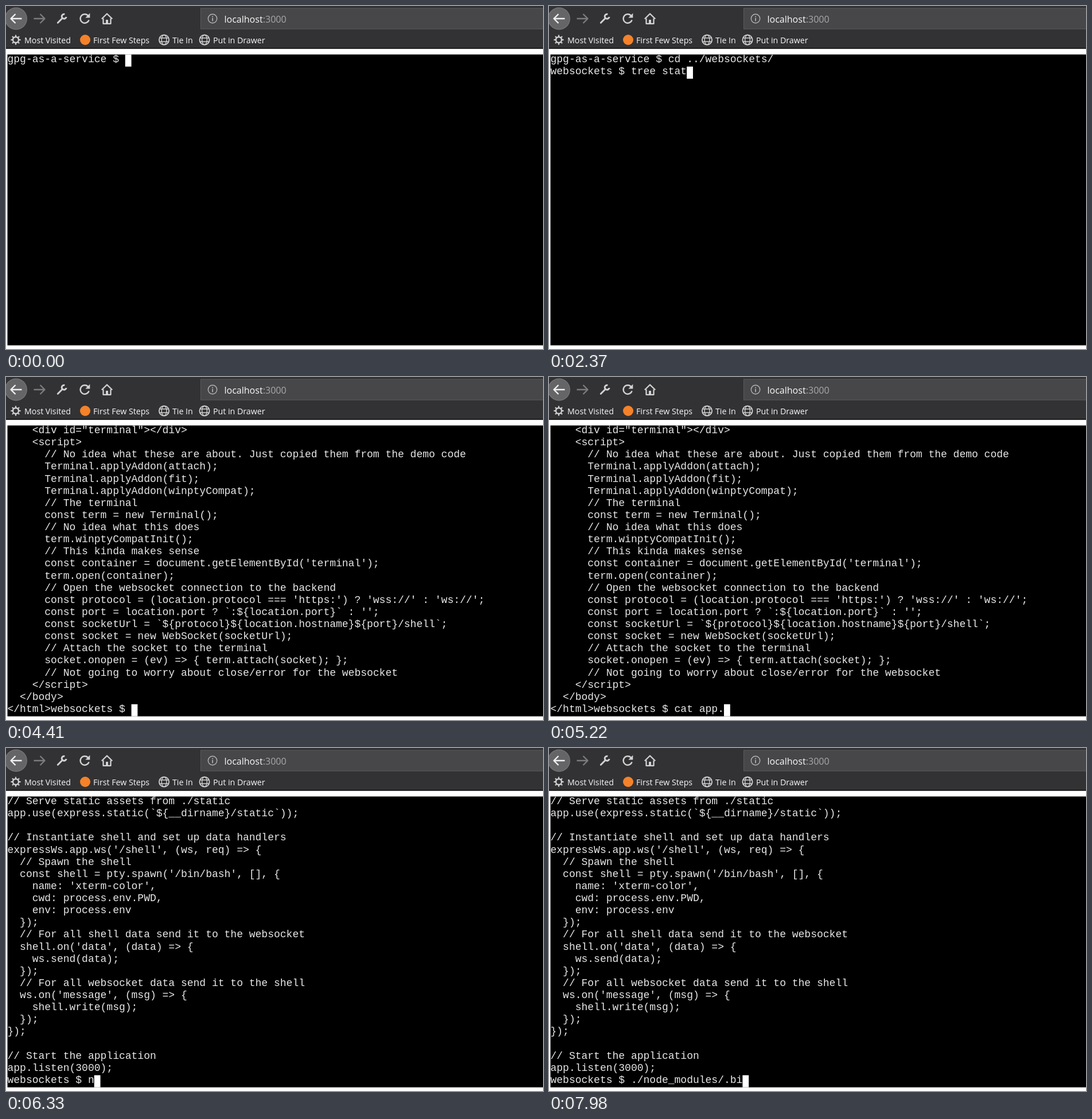
Animation of 936 by 598 pixels, one loop 8 s. Source, as an HTML page with a canvas:

```html
<!DOCTYPE html>
<html lang="en">
<head>
<meta charset="utf-8">
<title>Terminal in the browser</title>
<style>
  html, body { margin: 0; width: 100%; height: 100%; overflow: hidden; background: #fff; }
  canvas { display: block; }
</style>
</head>
<body>
<canvas id="stage" width="936" height="598"></canvas>
<script>
const ctx = document.getElementById("stage").getContext("2d");
const LOOP = 8000;
const LEFT = 2.5, TOP = 84.5, COL = 10.802, ROW = 21.13, BASELINE = 13.5;
const UI = '"Open Sans", "Noto Sans", sans-serif';
const MONO = '"Liberation Mono", monospace';

const STYLES = {
  plain: { color: "#e8e8e8" },
  file: { color: "#8ae234", bold: true },
  link: { color: "#34e2e2", bold: true },
  dir: { color: "#3465a4", back: "#4e9a06" }
};

const TREE = [
  [["dir", "static"]],
  [["plain", "├── "], ["file", "index.html"]],
  [["plain", "├── "], ["dir", "js"]],
  [["plain", "│   ├── "], ["file", "main.js"]],
  [["plain", "│   └── "], ["file", "main.ts"]],
  [["plain", "└── "], ["link", "node_modules"], ["plain", " -> "], ["dir", "../node_modules"]],
  "",
  "2 directories, 3 files"
];

const PAGE = `    <div id="terminal"></div>
    <script>
      // No idea what these are about. Just copied them from the demo code
      Terminal.applyAddon(attach);
      Terminal.applyAddon(fit);
      Terminal.applyAddon(winptyCompat);
      // The terminal
      const term = new Terminal();
      // No idea what this does
      term.winptyCompatInit();
      // This kinda makes sense
      const container = document.getElementById('terminal');
      term.open(container);
      // Open the websocket connection to the backend
      const protocol = (location.protocol === 'https:') ? 'wss://' : 'ws://';
      const port = location.port ? \`:\${location.port}\` : '';
      const socketUrl = \`\${protocol}\${location.hostname}\${port}/shell\`;
      const socket = new WebSocket(socketUrl);
      // Attach the socket to the terminal
      socket.onopen = (ev) => { term.attach(socket); };
      // Not going to worry about close/error for the websocket
    <\/script>
  </body>`.split("\n");

const SERVER = `// Serve static assets from ./static
app.use(express.static(\`\${__dirname}/static\`));

// Instantiate shell and set up data handlers
expressWs.app.ws('/shell', (ws, req) => {
  // Spawn the shell
  const shell = pty.spawn('/bin/bash', [], {
    name: 'xterm-color',
    cwd: process.env.PWD,
    env: process.env
  });
  // For all shell data send it to the websocket
  shell.on('data', (data) => {
    ws.send(data);
  });
  // For all websocket data send it to the shell
  ws.on('message', (msg) => {
    shell.write(msg);
  });
});

// Start the application
app.listen(3000);`.split("\n");

// Timeline: each entry holds the finished lines and the line with the cursor.
const timeline = [];

function show(time, lines, input) {
  timeline.push({ time, lines, input });
}

// Each key adds text; every \b removes one character.
function type(from, to, keys) {
  keys.forEach((key, i) => {
    const { lines, input } = timeline[timeline.length - 1];
    const time = keys.length > 1 ? from + (to - from) * i / (keys.length - 1) : from;
    const next = key[0] === "\b" ? input.slice(0, -key.length) : input + key;
    show(Math.round(time / 30) * 30, lines, next);
  });
}

function enter(time) {
  const { lines, input } = timeline[timeline.length - 1];
  show(time, [...lines, input].slice(-23), "");
}

function output(time, extra, prompt) {
  const { lines } = timeline[timeline.length - 1];
  show(time, [...lines, ...extra].slice(-23), prompt);
}

const PROMPT = "websockets $ ";
show(0, [], "gpg-as-a-service $ ");
type(60, 300, [..."cd .."]);
type(480, 540, [..."/e"]);
type(690, 1140, ["\b", ..."websoc", "kets/"]);
show(1560, ["gpg-as-a-service $ cd ../websockets/"], PROMPT);
type(1890, 2400, [..."tree stati"]);
type(2700, 2700, ["c"]);
enter(3030);
output(3060, TREE, PROMPT);
type(3300, 3480, [..."cat"]);
type(3630, 3870, [..." sta", "tic/"]);
type(4020, 4140, ["i", "n", "dex.html "]);
enter(4380);
output(4410, PAGE, "</html>" + PROMPT);
type(4620, 4980, [..."cat app"]);
type(5220, 5370, [...".ts"]);
enter(5730);
output(5760, SERVER, PROMPT);
type(6330, 6630, [..."node a", "pp"]);
type(6840, 6900, ["\b\b", "\b"]);
type(7080, 7200, ["\b", "\b\b", "\b\b"]);
type(7260, 7500, [..."./nod"]);
type(7620, 7620, ["e_modules/"]);
type(7830, 7980, [...".bi"]);

function rect(x, y, w, h, color) {
  ctx.fillStyle = color;
  ctx.fillRect(x, y, w, h);
}

function text(str, x, y, font, color) {
  ctx.font = font;
  ctx.fillStyle = color;
  ctx.fillText(str, x, y);
}

function disc(x, y, r, color) {
  ctx.fillStyle = color;
  ctx.beginPath();
  ctx.arc(x, y, r, 0, Math.PI * 2);
  ctx.fill();
}

function stroke(path, color, width) {
  ctx.strokeStyle = color;
  ctx.lineWidth = width;
  ctx.stroke(new Path2D(path));
}

function ring(x, y, r, color, width) {
  stroke(`M${x - r} ${y}a${r} ${r} 0 1 0 ${2 * r} 0a${r} ${r} 0 1 0 ${-2 * r} 0`, color, width);
}

function globe(x, y) {
  const color = "#d0d0d1";
  ring(x, y, 8.6, color, 1.8);
  stroke(`M${x - 8} ${y - 3.2}h16M${x - 8} ${y + 3.2}h16` +
    `M${x} ${y - 8.5}a4.4 8.5 0 0 0 0 17a4.4 8.5 0 0 0 0 -17`, color, 1.4);
}

function gear(x, y) {
  const color = "#d0d0d1";
  ring(x, y, 5, color, 2.4);
  for (let i = 0; i < 8; i++) {
    const a = i * Math.PI / 4, c = Math.cos(a), s = Math.sin(a);
    stroke(`M${x + 5.5 * c} ${y + 5.5 * s}L${x + 8.6 * c} ${y + 8.6 * s}`, color, 2.2);
  }
}

function drawToolbar() {
  const icon = "#d2d2d3";
  rect(0, 0, 936, 73, "#323234");
  rect(0, 73, 936, 1.7, "#0c0c0d");

  disc(17.5, 22, 19.4, "#7b7b7c");
  disc(17.5, 22, 18.4, "#656567");
  ctx.lineJoin = "round";
  stroke("M27.5 22H8.5M16.5 14L8.5 22l8 8", "#f0f0f1", 2.4);
  stroke("M48.5 22h19M59.5 14l8 8-8 8", "#7c7c7e", 2.4);

  // Wrench
  ctx.lineCap = "round";
  stroke("M90.3 29.2l8.2-8.2", icon, 3);
  ctx.lineCap = "butt";
  stroke("M102.3 14.4a4 4 0 1 0 2.8 4.6", icon, 3);

  // Reload
  stroke("M143.3 17.2a7.7 7.7 0 1 0 1.3 7.2", icon, 2.4);
  ctx.fillStyle = icon;
  ctx.fill(new Path2D("M146.3 12.5v8h-8z"));

  // Home
  stroke("M166.8 22.5l9.2-9 9.2 9", icon, 2.3);
  stroke("M169.5 21.5v9.3h13v-9.3", icon, 2.3);
  rect(174, 24, 4, 7, icon);

  rect(339, 3.5, 600, 37, "#5c5c5e");
  rect(340, 4.5, 600, 35, "#474749");
  ring(360, 22, 7.7, "#b4b4b6", 1.4);
  rect(359.2, 20.8, 1.7, 5.6, "#b4b4b6");
  rect(359.2, 17.6, 1.7, 1.8, "#b4b4b6");
  text("localhost", 380.5, 28.7, "16px " + UI, "#f9f9fa");
  text(":3000", 447.8, 28.7, "16px " + UI, "#a9a9ab");

  gear(17, 59);
  disc(138, 59, 9, "#f5822a");
  globe(275.5, 59);
  globe(346, 59);
  [["Most Visited", 32], ["First Few Steps", 152], ["Tie In", 290], ["Put in Drawer", 361]]
    .forEach(([label, x]) => text(label, x, 64.7, "14.2px " + UI, "#f9f9fa"));
}

function drawLine(line, row) {
  const parts = typeof line === "string" ? [["plain", line]] : line;
  const y = TOP + row * ROW;
  let col = 0;
  for (const [name, str] of parts) {
    const { color, back, bold } = STYLES[name];
    const x = LEFT + col * COL;
    if (back) rect(x, y, str.length * COL, ROW, back);
    text(str, x, y + BASELINE, (bold ? "bold " : "") + "18px " + MONO, color);
    col += str.length;
  }
}

function drawTerminal({ lines, input }) {
  rect(LEFT, TOP, 936 - LEFT, 24 * ROW, "#000");
  lines.forEach(drawLine);
  drawLine(input, lines.length);
  rect(LEFT + input.length * COL, TOP + lines.length * ROW, COL, ROW, "#fff");
}

function frame() {
  const now = performance.now() % LOOP;
  rect(0, 0, 936, 598, "#fff");
  drawToolbar();
  drawTerminal(timeline.filter(step => step.time <= now).pop());
  requestAnimationFrame(frame);
}
frame();
</script>
</body>
</html>
```
